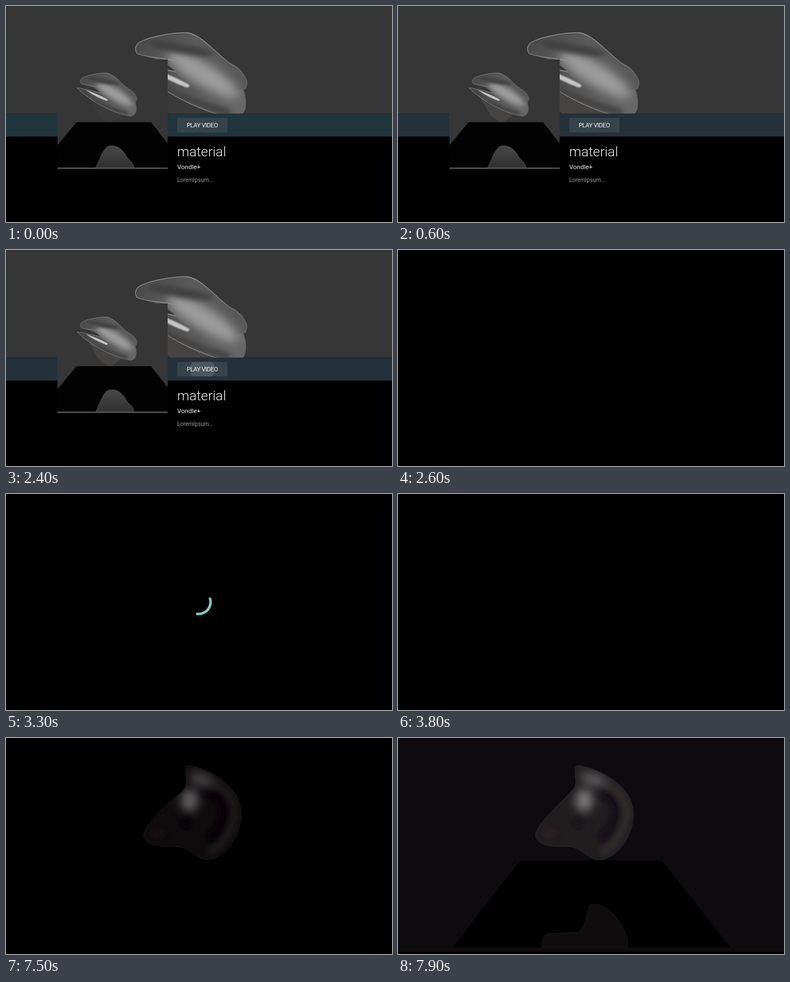
Write an HTML page that moves like this. It is 690 by 388 pixels and loops after 8 s.

```html
<!DOCTYPE html>
<html lang="en">
<head>
<meta charset="utf-8">
<title>Details and playback</title>
<style>
html, body { margin: 0; width: 100%; height: 100%; overflow: hidden; background: #000; }
svg { display: block; width: 100vw; height: 100vh; }
text { font-family: Roboto, "Open Sans", sans-serif; fill: #f2f2f2; }
.soft { filter: url(#b5); }
.wide { filter: url(#b10); }
.line { fill: none; }
</style>
</head>
<body>
<svg viewBox="0 0 690 388">
  <defs>
    <filter id="b1" x="-50%" y="-50%" width="200%" height="200%"><feGaussianBlur stdDeviation="1"/></filter>
    <filter id="b5" x="-60%" y="-60%" width="220%" height="220%"><feGaussianBlur stdDeviation="5"/></filter>
    <filter id="b10" x="-90%" y="-90%" width="280%" height="280%"><feGaussianBlur stdDeviation="9"/></filter>
    <filter id="fade" x="0" y="0" width="100%" height="100%" color-interpolation-filters="sRGB">
      <feComponentTransfer>
        <feFuncR type="linear"/><feFuncG type="linear"/><feFuncB type="linear"/>
      </feComponentTransfer>
    </filter>
    <linearGradient id="lobeFill" x2="1" y2=".5">
      <stop stop-color="#464646"/><stop offset=".5" stop-color="#5c5c5c"/><stop offset="1" stop-color="#585858"/>
    </linearGradient>
    <linearGradient id="wingFill" x2="1" y2=".6">
      <stop stop-color="#3e3e3e"/><stop offset="1" stop-color="#666"/>
    </linearGradient>
    <linearGradient id="rim" x2="1">
      <stop stop-color="#858585"/><stop offset=".5" stop-color="#9c9c9c"/><stop offset="1" stop-color="#666"/>
    </linearGradient>
    <linearGradient id="mirrorFill" x2="0" y2="1">
      <stop stop-color="#484848"/><stop offset="1" stop-color="#303030"/>
    </linearGradient>
    <path id="lobe" d="M231 75C234 58 300 47 324 48C352 52 375 86 402 104C424 114 433 135 430 142Q428 152 418 150C380 165 320 140 300 115C275 92 245 92 234 85Z"/>
    <path id="wing" d="M220 101C255 104 290 118 340 125L424 150C432 175 430 198 408 201C350 192 270 150 220 101Z"/>
    <clipPath id="gemClip"><use href="#lobe"/><use href="#wing"/></clipPath>
    <clipPath id="blobClip"><path class="blob"/></clipPath>
    <clipPath id="topClip"><rect width="690" height="193.5"/></clipPath>
    <clipPath id="cardClip"><rect x="92" y="96" width="197" height="197"/></clipPath>
    <clipPath id="btnClip"><rect x="306" y="201" width="90" height="26" rx="2"/></clipPath>

    <g id="poster">
      <rect width="690" height="388" fill="#363636"/>
      <path d="M218 222H480L606 382H86Z" fill="#020202"/>
      <rect y="382" width="690" height="6" fill="#484848"/>
      <path d="M286 382C300 350 310 325 322 312C335 300 360 304 375 318C390 330 392 345 404 356Q418 366 420 382Z"
        fill="url(#mirrorFill)" stroke="#505050" stroke-width="1.5"/>
      <path id="body" d="M258 130L295 195Q320 218 335 220Q350 218 376 192Z" fill="#454443" stroke="#505050"/>
      <use href="#wing" fill="url(#wingFill)" stroke="url(#rim)" stroke-width="1.6"/>
      <use href="#lobe" fill="url(#lobeFill)"/>
      <g clip-path="url(#gemClip)">
        <ellipse class="wide" cx="352" cy="122" rx="74" ry="20" fill="#9c9c9c" transform="rotate(32 352 122)"/>
        <ellipse class="soft" cx="312" cy="76" rx="60" ry="9" fill="#404040" transform="rotate(10 312 76)"/>
        <path class="line soft" d="M285 150Q340 176 400 192" stroke="#404040" stroke-width="12"/>
      </g>
      <path class="line" d="M300 98C275 92 245 92 234 85Q228 76 236 67C250 56 300 47 324 48C352 52 375 86 402 104C424 114 433 135 430 142Q428 152 420 150"
        stroke="url(#rim)" stroke-width="1.4"/>
      <path d="M250 108Q290 121 327 141Q330 147 322 146Q285 133 250 108Z" fill="#c4c4c4" filter="url(#b1)"/>
    </g>
  </defs>

  <rect width="690" height="388" fill="#000"/>

  <g id="details">
    <use href="#poster" clip-path="url(#topClip)"/>
    <rect id="band" y="193.5" width="690" height="41"/>
    <g clip-path="url(#cardClip)"><use href="#poster" transform="translate(15.3 96) scale(.508)"/></g>
    <rect x="306" y="201" width="90" height="26" rx="2" fill="#36434b"/>
    <g clip-path="url(#btnClip)"><circle id="ripple" cx="351" cy="214" fill="#4c575e"/></g>
    <text x="323" y="218" font-size="11" letter-spacing="-.45">PLAY VIDEO</text>
    <text x="306" y="270" font-size="24.4" font-weight="300">material</text>
    <text x="306" y="293" font-size="11.5">Vondle+</text>
    <text x="306" y="316" font-size="10.06" style="fill:#9c9c9c">LoremIpsum...</text>
  </g>

  <circle id="spinner" class="line" cx="344" cy="194" r="21.6" stroke="#80cbc4" stroke-width="4.5" pathLength="1"/>

  <g id="film" filter="url(#fade)">
    <rect width="690" height="388" fill="#000"/>
    <rect width="690" height="384" fill="#0d0b0e"/>
    <path d="M218 220H472L594 376.500H97Z" fill="#000"/>
    <path d="M258 376Q254 355 270 351L322 349C340 335 335 305 347 299C365 292 412 330 411 376Z" fill="#0e0c0d" stroke="#1a1718"/>
    <path class="blob" fill="#201d1f"/>
    <g clip-path="url(#blobClip)">
      <path class="line soft" d="M352 94Q395 105 390 138Q384 168 362 180" stroke="#121012" stroke-width="16"/>
      <path class="line soft" d="M372 82Q410 102 408 140Q398 190 362 206" stroke="#2d292b" stroke-width="16"/>
      <ellipse class="wide" cx="350" cy="75" rx="24" ry="12" fill="#5c595a" transform="rotate(18 350 75)"/>
      <ellipse class="wide" id="glow" cy="112" rx="15" ry="20" fill="#807c7d"/>
      <ellipse class="soft" cx="322" cy="152" rx="7" ry="10" fill="#141113"/>
      <ellipse class="soft" cx="272" cy="171" rx="13" ry="7" fill="#2b2425"/>
    </g>
    <path class="blob line" stroke="#2c292a"/>
  </g>
</svg>
<script>
const LOOP = 8000, STEP = 100;
const $ = id => document.getElementById(id);
const all = q => document.querySelectorAll(q);
const mix = (a, b, k) => a + (b - a) * k;
const ramp = (t, a, b) => Math.min(1, Math.max(0, (t - a) / (b - a)));
const ease = k => k * k * (3 - 2 * k);
const set = (el, attrs) => { for (const a in attrs) el.setAttribute(a, attrs[a]); };
const show = (el, on) => set(el, { display: on ? 'inline' : 'none' });

function drawDetails(t) {
  const settle = ramp(t, 0, 600);
  set($('band'), { fill: `hsl(${mix(197, 205, settle)}, ${mix(30, 23, settle)}%, 18.4%)` });
  set($('body'), { opacity: mix(.35, 1, settle) });
  set($('ripple'), { r: t < 2300 ? 0 : mix(11, 22, ramp(t, 2300, 2400)) });
}

// Arc that grows, then shrinks, while it turns
function drawSpinner(t) {
  const k = t / 1333;
  const from = .75 * ease(ramp(k, .5, 1)), to = .75 * ease(ramp(k, 0, .5)) + .02;
  const turn = 360 * (from + .25 * k) + 720 * t / 4444 - 90;
  set($('spinner'), { 'stroke-dasharray': `${to - from} 2`, transform: `rotate(${turn} 344 194)` });
}

// The tip leans left while the light comes up from black
function drawFilm(k) {
  const tip = mix(331, 322, k), notch = mix(328, 318, k);
  const d = `M${tip} 49.500C${tip + 18} 50 421 76 421 138C418 185 388 215 365 218C335 222 335 193 295 195
    C270 196 246 190 246 174C246 160 278 128 ${notch - 10} 98Q${notch + 1} 88 ${notch} 76C${notch - 3} 58 ${tip - 6} 49 ${tip} 49.500Z`;
  for (const el of all('.blob')) set(el, { d });
  set($('glow'), { cx: mix(322, 333, k) });
  for (const el of all('#fade feComponentTransfer > *')) set(el, { slope: mix(.8, 1, k), intercept: mix(-.13, 0, k) });
}

const scenes = [
  { id: 'details', from: 0, to: 2600, draw: drawDetails },
  { id: 'spinner', from: 3000, to: 3800, draw: t => drawSpinner(t - 3000) },
  { id: 'film', from: 6900, to: LOOP, draw: t => drawFilm(ramp(t, 7000, 7900)) }
];

function draw(t) {
  for (const s of scenes) {
    const on = t >= s.from && t < s.to;
    show($(s.id), on);
    if (on) s.draw(t);
  }
}

const start = performance.now();
function tick() {
  const t = (performance.now() - start) % LOOP;
  draw(Math.floor(t / STEP) * STEP);
  requestAnimationFrame(tick);
}
tick();
</script>
</body>
</html>
```
